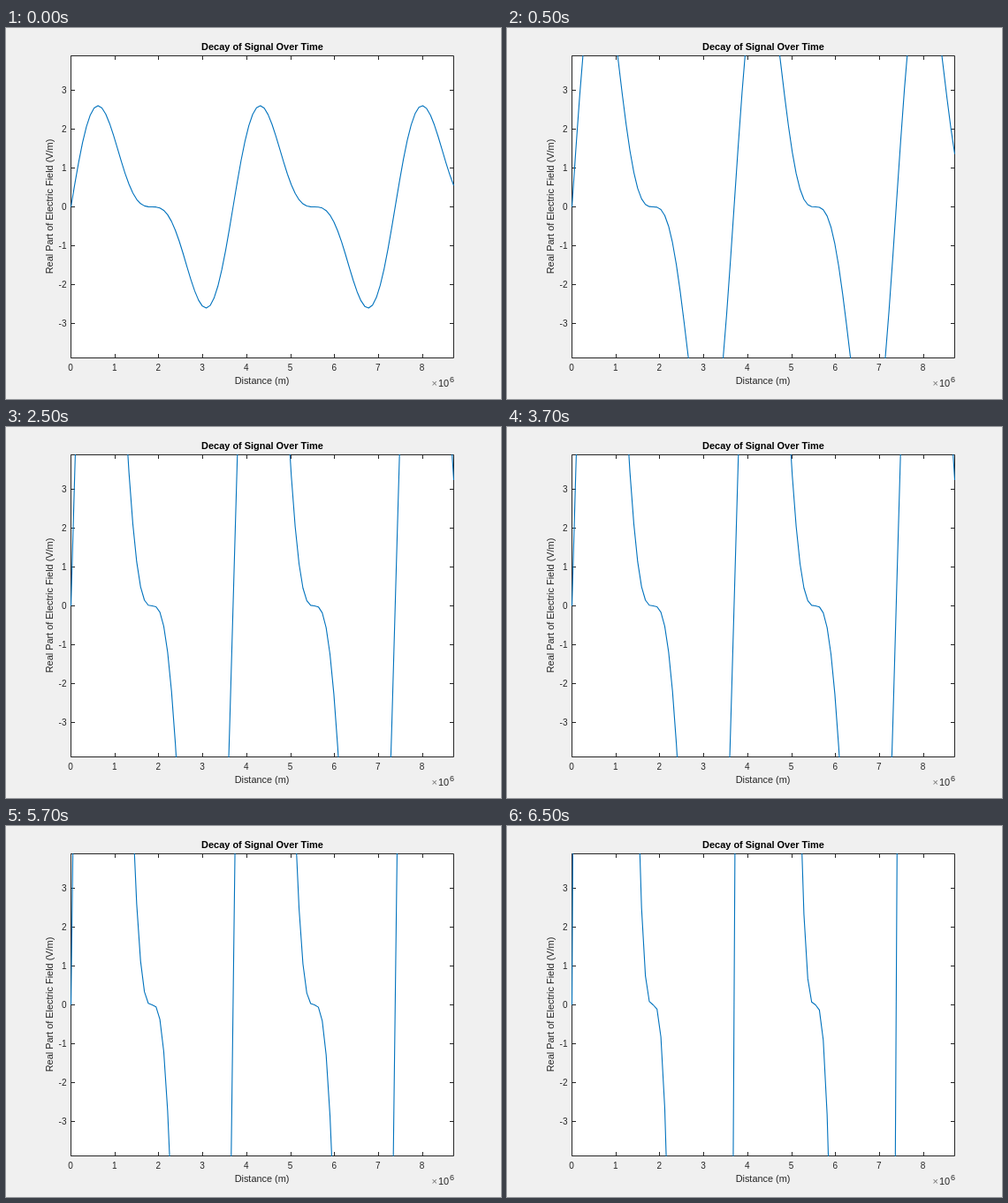
Animation, 560 px wide and 420 px high, one loop 8 s. Source, as an HTML page with a canvas:

```html
<!DOCTYPE html>
<html lang="en">
<head>
<meta charset="utf-8">
<title>Decay of Signal Over Time</title>
<style>
  html, body { margin: 0; width: 100%; height: 100%; overflow: hidden; background: #f0f0f0; }
  canvas { display: block; width: 560px; height: 420px; }
</style>
</head>
<body>
<canvas id="plot" width="560" height="420"></canvas>
<script>
const ctx = document.getElementById('plot').getContext('2d');
const LOOP = 8000, FIRST = 500, HOLD = 2000;
const BOX = { x: 73.5, y: 31.5, w: 433, h: 342 };
const RIGHT = BOX.x + BOX.w, BOTTOM = BOX.y + BOX.h;
const X_UNIT = 49.7, Y_UNIT = 44.1;
const POINTS = 100, PHASE_STEP = 0.14984;
const INK = '#262626', FONT = '"Liberation Sans", Arial, sans-serif';

const px = x => BOX.x + x * X_UNIT;
const py = y => BOX.y + BOX.h / 2 - y * Y_UNIT;
const snap = v => Math.floor(v) + 0.5;
const gain = step => Math.exp(0.924 * step - 0.019 * step * step);

function text(str, x, y, size, align = 'center', weight = 'normal', color = INK) {
  ctx.font = `${weight} ${size}px ${FONT}`;
  ctx.textAlign = align;
  ctx.fillStyle = color;
  ctx.fillText(str, x, y);
}

function line(x1, y1, x2, y2) {
  ctx.moveTo(x1, y1);
  ctx.lineTo(x2, y2);
}

function drawCurve(scale) {
  ctx.save();
  ctx.beginPath();
  ctx.rect(BOX.x - 0.5, BOX.y - 0.5, BOX.w + 1, BOX.h + 1);
  ctx.clip();
  ctx.beginPath();
  for (let i = 0; i < POINTS; i++) {
    const phase = i * PHASE_STEP;
    const value = scale * (2 * Math.sin(phase) + Math.sin(2 * phase));
    ctx.lineTo(BOX.x + BOX.w * i / (POINTS - 1), py(value));
  }
  ctx.strokeStyle = '#0072bd';
  ctx.lineWidth = 1.1;
  ctx.lineJoin = 'round';
  ctx.stroke();
  ctx.restore();
}

function drawAxes() {
  ctx.strokeStyle = INK;
  ctx.lineWidth = 1;
  ctx.beginPath();
  ctx.rect(BOX.x, BOX.y, BOX.w, BOX.h);
  for (let i = 0; i <= 8; i++) {
    const x = snap(px(i));
    line(x, BOTTOM, x, BOTTOM - 4.5);
    line(x, BOX.y, x, BOX.y + 4.5);
    text(i, px(i) - 0.5, 388, 10);
  }
  for (let i = -3; i <= 3; i++) {
    const y = snap(py(i));
    line(BOX.x, y, BOX.x + 4.5, y);
    line(RIGHT, y, RIGHT - 4.5, y);
    text(i, 68.5, py(i) + 3.6, 10, 'right');
  }
  ctx.stroke();
}

function drawLabels() {
  text('Decay of Signal Over Time', 290, 25, 10.95, 'center', 'bold', '#000');
  text('Distance (m)', 289.5, 403, 10.9);
  text('×', 481.5, 406, 11, 'left', 'normal', '#777');
  text('10', 489, 406, 11, 'left');
  text('6', 502, 401, 9, 'left');
  ctx.save();
  ctx.translate(53, 202);
  ctx.rotate(-Math.PI / 2);
  text('Real Part of Electric Field (V/m)', 0, 0, 10.9);
  ctx.restore();
}

function draw(now) {
  const t = now % LOOP;
  const step = t < FIRST ? 0 : 1 + Math.floor((t - FIRST) / HOLD);
  ctx.fillStyle = '#f0f0f0';
  ctx.fillRect(0, 0, 560, 420);
  ctx.fillStyle = '#fff';
  ctx.fillRect(BOX.x, BOX.y, BOX.w, BOX.h);
  drawAxes();
  drawCurve(gain(step));
  drawLabels();
}

const start = performance.now();
function tick() {
  draw(performance.now() - start);
  requestAnimationFrame(tick);
}
tick();
</script>
</body>
</html>
```
